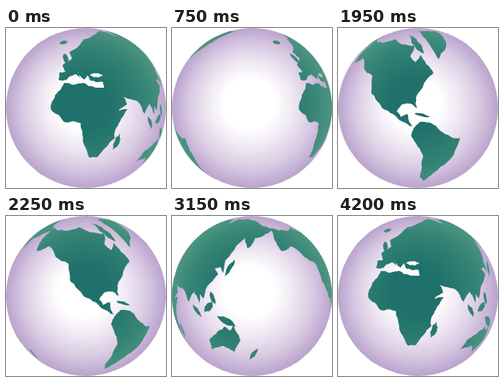
An HTML page with a canvas that plays this animation: 201 by 201 pixels, repeating every 4350 ms.

```html
<!DOCTYPE html>
<html lang="en">
<head>
<meta charset="utf-8">
<title>Spinning globe</title>
<style>
html, body { margin: 0; width: 100%; height: 100%; overflow: hidden; background: #fff; }
canvas { display: block; width: 201px; height: 201px; }
</style>
</head>
<body>
<canvas id="globe" width="201" height="201"></canvas>
<script>
const ctx = document.getElementById('globe').getContext('2d');
const R = 100.5, STEPS = 29, STEP_MS = 150, TURN = 2 * Math.PI, HALF = Math.PI / 2;
const clamp = (v, m) => Math.max(-m, Math.min(m, v));

let seed = 7;
const random = () => (seed = seed * 16807 % 2147483647) / 2147483647;

// Disc position to longitude and latitude on the turned globe.
function toSphere([x, y], step) {
  const lat = Math.asin(clamp(1 - y / R, 1));
  const lon = Math.asin(clamp((x / R - 1) / Math.cos(lat), 1));
  return [lon - step / STEPS * TURN, lat];
}

// Split an edge again and again, nudging each midpoint sideways for a ragged coast.
function ragged(a, b, depth) {
  if (!depth) return [a];
  const dx = b[0] - a[0], dy = b[1] - a[1], push = (random() - .5) * .2;
  const mid = [(a[0] + b[0]) / 2 - dy * push, (a[1] + b[1]) / 2 + dx * push];
  return [...ragged(a, mid, depth - 1), ...ragged(mid, b, depth - 1)];
}

function outline(step, corners) {
  const pts = corners.map(p => toSphere(p, step));
  return pts.flatMap((p, i) => ragged(p, pts[(i + 1) % pts.length], 3));
}

const coast = (step, path) => outline(step, path.split(' ').map(p => p.split(',').map(Number)));

// A slim island from one end to the other.
function island(step, x1, y1, x2, y2, width) {
  const half = width / 2 / Math.hypot(x2 - x1, y2 - y1);
  const nx = (y1 - y2) * half, ny = (x2 - x1) * half;
  const side = (t, s) => [x1 + (x2 - x1) * t + nx * s, y1 + (y2 - y1) * t + ny * s];
  return outline(step, [[x1, y1], side(.3, 1), side(.7, 1), [x2, y2], side(.7, -1), side(.3, -1)]);
}

// Steps of the turn at which each side of the globe faces the viewer.
const WEST = 13, EAST = 21, AFRICA = 28, EUROPE = 0;

const lands = [
  // Africa and Madagascar
  coast(AFRICA, '54,69 77,69 83,73 104,76 122,104 133,102 118,126 117,139 107,150 98,162 88,163 77,142 73,120 53,118 38,102 43,84'),
  island(AFRICA, 124, 133, 117, 153, 7),
  // Europe to India
  coast(EUROPE, '66,65 67,56 75,55 71,47 83,38 80,30 98,14 120,4 148,15 177,47 187,70 190,88 181,94 174,108 167,94 147,86 152,96 139,104 123,76 122,68 106,66 103,59 99,65 90,55 93,63 87,58 76,65'),
  island(EUROPE, 73, 32, 77, 45, 6),
  island(EUROPE, 67, 19, 78, 17, 4),
  // Eastern Asia
  coast(EAST, '65,15 84,4 104,6 128,18 104,28 95,41 92,27 80,39 67,56 64,72 61,64 54,66 58,73 43,91 40,104 35,98 35,109 26,93 34,88 37,70 44,47'),
  island(EAST, 66, 76, 79, 55, 5),
  island(EAST, 48, 95, 54, 111, 5),
  island(EAST, 41, 121, 51, 108, 8),
  island(EAST, 26, 111, 37, 127, 4),
  // Australia and its neighbours
  coast(EAST, '47,157 52,150 66,139 73,144 78,137 86,156 79,171 64,163 50,168'),
  island(EAST, 56, 125, 81, 139, 7),
  island(EAST, 108, 166, 97, 181, 4),
  // The Americas
  coast(WEST, '21,44 31,30 50,15 72,14 96,22 91,36 97,43 104,34 120,57 107,73 98,88 99,101 94,96 80,96 74,105 79,112 87,108 92,122 98,126 82,118 66,107 50,93 42,82 43,60 32,38'),
  coast(WEST, '95,126 103,118 118,120 133,132 153,138 146,158 128,175 107,192 103,187 107,161 92,136'),
  coast(WEST, '102,4 122,4 136,18 126,39 117,24'),
  island(WEST, 90, 9, 108, 32, 8),
  island(WEST, 96, 107, 116, 112, 3)
];
const blackSea = island(EUROPE, 105, 59, 122, 60, 5);

function shade(...colors) {
  const g = ctx.createRadialGradient(97, 95, 32, R, R, R);
  colors.forEach((c, i) => g.addColorStop(i / (colors.length - 1), c));
  return g;
}
const water = shade('#ffffff', '#eee7f2', '#d9cae3', '#bba3cd');
const green = shade('#20716b', '#2a7a70', '#368476', '#4c9581');

function fillShape(points, now) {
  const turn = now / STEPS * TURN;
  const middle = points[0][0] + turn;
  const home = turn - TURN * Math.round(middle / TURN);
  for (const offset of [home - TURN, home, home + TURN]) {
    ctx.beginPath();
    for (const [lon, lat] of points) {
      const seen = clamp(lon + offset, HALF);
      ctx.lineTo(R + R * Math.cos(lat) * Math.sin(seen), R - R * Math.sin(lat));
    }
    ctx.fill();
  }
}

function draw(now) {
  ctx.clearRect(0, 0, 201, 201);
  ctx.fillStyle = water;
  ctx.beginPath();
  ctx.arc(R, R, R, 0, TURN);
  ctx.fill();
  ctx.fillStyle = green;
  lands.forEach(l => fillShape(l, now));
  ctx.fillStyle = water;
  fillShape(blackSea, now);
}

const start = performance.now();
let shown = -1;
function tick() {
  const now = Math.floor((performance.now() - start) / STEP_MS) % STEPS;
  if (now !== shown) draw(shown = now);
  requestAnimationFrame(tick);
}
tick();
</script>
</body>
</html>
```
